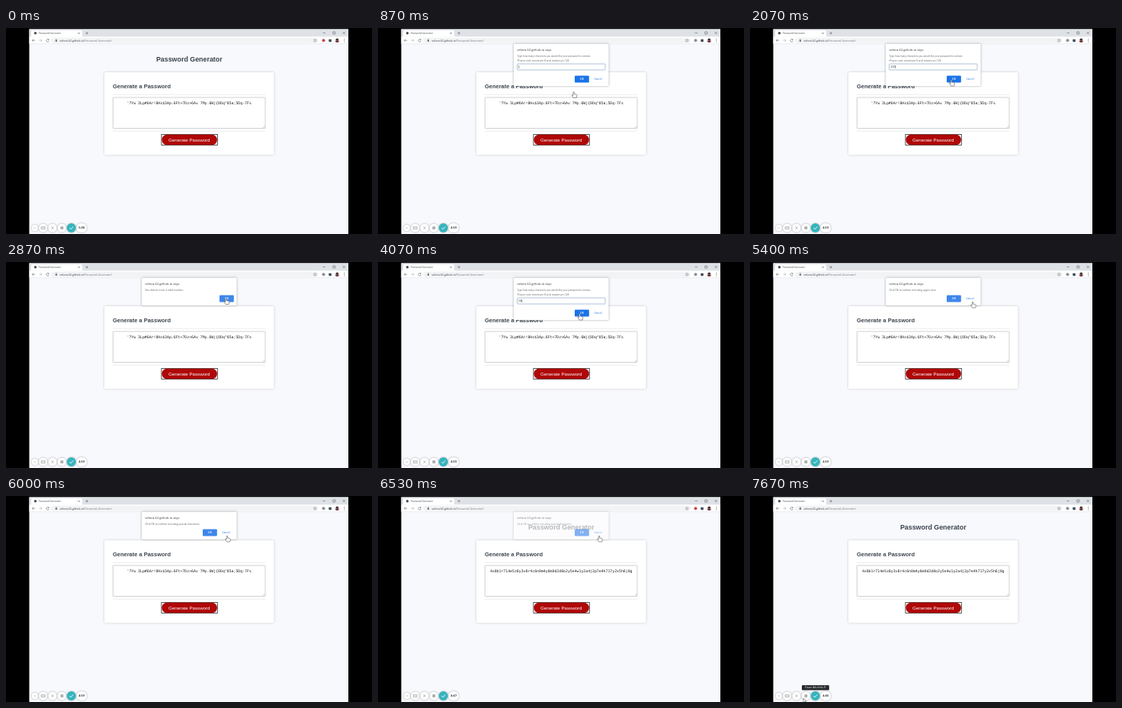
An HTML page for the animation above (7740 ms loop, 480x270 px).

```html
<!DOCTYPE html>
<html lang="en">
<head>
<meta charset="utf-8">
<title>Password Generator</title>
<style>
  html, body { margin: 0; width: 100%; height: 100%; overflow: hidden; background: #000; }
  svg { display: block; width: 100vw; height: 100vh; }
  text { white-space: pre; }
  .ui { font-family: "Open Sans", "Noto Sans", sans-serif; }
  .page { font-family: "Liberation Sans", Arial, sans-serif; }
  .mono { font-family: "DejaVu Sans Mono", "Noto Sans Mono", monospace; }
  .mid { text-anchor: middle; }
  .line { fill: none; stroke: #5f6368; stroke-width: .6; }
  .card { filter: drop-shadow(0 .6px 1.6px rgba(0, 0, 0, .2)); }
  .dialog { filter: drop-shadow(0 .8px 1.6px rgba(0, 0, 0, .35)); }
  .knob { fill: #fff; filter: drop-shadow(0 .4px .8px rgba(0, 0, 0, .35)); }
</style>
</head>
<body>
<svg id="stage" viewBox="0 0 480 270">
  <rect width="480" height="270" fill="#000"/>
  <rect x="30.5" y="1.5" width="418.5" height="268.5" fill="#f8f9fd"/>

  <!-- browser frame -->
  <g class="ui">
    <rect x="30.5" y="1.5" width="418.5" height="10" fill="#dee1e6"/>
    <path d="M31.5 11.5Q33 11.5 33 10V4.5Q33 3 34.5 3H98.500Q100 3 100 4.500V10Q100 11.500 101.500 11.500Z" fill="#fff"/>
    <rect x="30.5" y="11.500" width="418.500" height="9" fill="#fff"/>
    <rect x="59" y="12.700" width="351" height="6.800" rx="3.400" fill="#f1f3f4"/>
    <path d="M30.5 20.600H449" stroke="#dcdfe3" stroke-width=".5"/>
    <circle cx="38.500" cy="6.800" r="1.700" fill="#4b4f54"/>
    <text x="43" y="8" font-size="3.050" fill="#4b4f54">Password Generator</text>
    <path class="line" d="M94.500 5.700l2.200 2.200m0-2.200l-2.200 2.200M104.400 6.800h3.400m-1.700-1.700v3.400M415.500 6.500h3.400M428.800 5h3v3h-3zM441.700 5l3 3m0-3l-3 3"/>
    <path class="line" d="M38.200 16.200h-3.800m1.700-1.700l-1.700 1.700l1.700 1.700M56 15.200a1.800 1.800 0 1 0 .4 1.600m-.2-2.500v1.300h-1.300"/>
    <path class="line" d="M43.300 16.200h3.800m-1.700-1.700l1.700 1.700l-1.700 1.700" opacity=".5"/>
    <rect x="64.800" y="15.800" width="2.200" height="1.900" fill="#5f6368"/>
    <path class="line" d="M65.200 15.800v-.7a.7.7 0 0 1 1.400 0v.7" style="stroke-width:.4"/>
    <text x="70.500" y="17.500" font-size="3.600" fill="#3c4043">velora-62.github.io<tspan fill="#777c82">/Password-Generator/</tspan></text>
    <path class="line" d="M405.200 14.200l.6 1.400 1.500.1-1.100 1 .3 1.500-1.300-.8-1.300.8.3-1.500-1.100-1 1.500-.1z" style="stroke-width:.4"/>
    <circle id="rec" cx="416.500" cy="16.300" r="2"/>
    <rect x="423.300" y="14.700" width="3.500" height="3.500" rx=".6" fill="#3f4a59"/>
    <circle cx="434.300" cy="16.200" r="2.900" fill="#d9c7c4"/>
    <circle cx="434.300" cy="15.300" r="1.500" fill="#33272a"/>
    <path d="M431.900 17.800a2.500 1.700 0 0 1 4.800 0a2.900 2.900 0 0 1-4.800 0z" fill="#74343b"/>
    <path d="M443.800 14.400v.01m0 1.800v.01m0 1.800v.01" stroke="#5f6368" stroke-width="1" stroke-linecap="round"/>
  </g>

  <!-- page -->
  <g class="page" fill="#3b444e">
    <text class="mid" x="240.300" y="44.300" font-size="8.900" font-weight="700">Password Generator</text>
    <rect class="card" x="129" y="58" width="222.500" height="108.300" rx="1.500" fill="#fff"/>
    <text x="140" y="79.300" font-size="7.470" font-weight="700">Generate a Password</text>
    <path d="M140 87.300H340M140 135.200H340" stroke="#e7e9eb" stroke-width=".8"/>
    <rect x="140.300" y="91" width="199.700" height="40.500" rx=".8" fill="#fff" stroke="#b9bec4" stroke-width=".7"/>
    <path d="M336.500 131l3-3m-1.300 3l1.300-1.300" stroke="#999" stroke-width=".4"/>
    <text id="password" class="mono mid" x="240.200" y="100.200" font-size="4.850" fill="#222"></text>
    <rect x="203.900" y="139.400" width="73.400" height="14.200" fill="#fff" stroke="#2b2b2b" stroke-width=".8"/>
    <rect x="204.300" y="139.800" width="72.600" height="13.400" rx="6.500" fill="#af0808"/>
    <text class="mid" x="240.300" y="148.700" font-size="6.170" fill="#fff">Generate Password</text>
  </g>

  <g id="dialogs" class="ui"></g>

  <!-- recorder controls -->
  <g class="ui">
    <circle class="knob" cx="37.800" cy="262" r="4.300"/>
    <circle class="knob" cx="48.700" cy="262" r="5.600"/>
    <circle class="knob" cx="61" cy="262" r="5.600"/>
    <circle class="knob" cx="73.300" cy="262" r="5.600"/>
    <circle class="knob" cx="85.700" cy="262" r="5.900" style="fill:#35b5bd"/>
    <rect class="knob" x="92.300" y="256" width="13.800" height="12" rx="6"/>
    <path class="line" d="M36.400 262h2.800M46.200 260.300h5v3.400h-5zM46.200 262h5M59.300 260.300l3.400 3.400m0-3.400l-3.400 3.400" opacity=".65"/>
    <path d="M72.300 260.100v3.800m2-3.800v3.800" stroke="#555" stroke-width=".9"/>
    <path d="M83.300 262.100l1.700 1.700l3.200-3.500" fill="none" stroke="#fff" stroke-width=".9"/>
    <text id="timer" class="mid" x="99.200" y="263.400" font-size="4" font-weight="700" fill="#3d4145"></text>
    <g id="tip">
      <rect x="68" y="248" width="35.800" height="6.600" rx="1" fill="#26282b"/>
      <text class="mid" x="85.900" y="252.400" font-size="3.100" fill="#fff">Pause (Alt+Shift+P)</text>
    </g>
  </g>

  <g id="cursor" stroke="#555" stroke-width=".6" stroke-linejoin="round" fill="#fff">
    <path id="hand" d="M-.7.6Q0-.5.7.6V3l3 .7Q4.500 4 4.300 5L3.700 8H-.4L-2.400 5Q-2.600 3.900-1.600 4.200L-.7 5Z"/>
    <path id="arrow" d="M0 0V5.600L1.300 4.500L2.200 6.500L3.100 6.100L2.200 4.200H4Z"/>
  </g>
</svg>
<script>
const LOOP = 7740, STEP = 200 / 3, BLUE = "#1a73e8";
const $ = id => document.getElementById(id);
const clamp = v => Math.max(0, Math.min(1, v));

const OLD_PASS = "'7Yw 3Lp#6Ar!0Hx$3Ap.6Ft=7Dz>6Av 7My.6Wj{0Dq^85a;5Dq-7Fs";
const NEW_PASS = "4x8b1r714e5z8y3v8r4c6n0m4y6m0d2d8o2y5e4w1y2a4j2p7e4h717y2x5h6j0g";
const DONE = 6470;

const ask = ["Type how many characters you would like your password to contain.",
  "Please note minimum 8 and maximum 128"];
const confirmText = what => ["Click OK to confirm including " + what];

const dialogs = [
  { from: 700, to: 2260, kind: "prompt", text: ask, typed: [[1590, "2"], [1720, "20"], [2050, "200"]] },
  { from: 2300, to: 2920, kind: "alert", text: ["You did not enter a valid number."] },
  { from: 2960, to: 4200, kind: "prompt", text: ask, typed: [[3320, "6"], [3450, "64"]] },
  { from: 4250, to: 4660, kind: "confirm", text: confirmText("lower case.") },
  { from: 4700, to: 5060, kind: "confirm", text: confirmText("numbers.") },
  { from: 5100, to: 5600, kind: "confirm", text: confirmText("upper case.") },
  { from: 5650, to: DONE, kind: "confirm", text: confirmText("special characters") }
];

// time, x, y of the pointer tip
const path = [
  [66, 87, 262], [600, 244, 146], [730, 244, 146], [867, 256.6, 83.500], [1130, 264, 68],
  [2270, 264, 68], [2730, 288.500, 47.500], [2930, 288.500, 47.500], [3600, 274, 62],
  [3930, 264.500, 68], [4270, 264.500, 68], [4530, 267, 48], [5070, 267, 48],
  [5330, 292, 52], [5670, 292, 52], [5930, 290, 52], [6670, 290, 52],
  [7000, 225, 120], [7530, 70, 265]
];

const recOn = [[0, 330], [1200, 1530], [3130, 3470], [4530, 4870], [6330, 6600]];

const label = (x, y, size, fill, text, extra = "") =>
  `<text x="${x}" y="${y}" font-size="${size}" fill="${fill}" ${extra}>${text}</text>`;

function buildDialog(d) {
  const prompt = d.kind === "prompt", alert = d.kind === "alert";
  const top = prompt ? 62.6 : 43.4, okX = alert ? 280 : 258;
  let html = `<rect class="dialog" x="178" y="20.800" width="124.500" height="${prompt ? 55.200 : 36.200}" rx="1.200" fill="#fff"/>`;
  html += label(182.5, 30, 4.1, "#303438", "velora-62.github.io says");
  d.text.forEach((s, i) => {
    const size = prompt ? 3.05 + i * .35 : 3.25;
    html += label(182.500, 37.7 + i * 5.900, size, "#5f6368", s);
  });
  if (prompt) {
    html += `<rect x="182.600" y="47" width="115.400" height="8" rx=".8" fill="#fff" stroke="#8fa6c9" stroke-width=".7"/>`;
    html += label(184.500, 52.300, 3.400, "#333", "", 'data-typed=""');
    html += `<path data-caret="" d="M0 49v4" stroke="#333" stroke-width=".5"/>`;
  }
  html += `<rect x="${okX}" y="${top}" width="18.800" height="9" rx="1" fill="${prompt ? BLUE : "#3d86ea"}"/>`;
  html += label(okX + 9.4, top + 5.700, 3.300, "#fff", "OK", 'class="mid" font-weight="600"');
  if (!alert) html += label(288.500, top + 5.700, 3.300, BLUE, "Cancel", 'class="mid"');
  const g = document.createElementNS("http://www.w3.org/2000/svg", "g");
  g.innerHTML = html;
  $("dialogs").append(g);
  d.node = g;
  d.input = g.querySelector("[data-typed]");
  d.caret = g.querySelector("[data-caret]");
}

function pointer(t) {
  const i = path.findIndex(p => p[0] > t);
  if (i < 0) return path[path.length - 1].slice(1);
  if (i === 0) return path[0].slice(1);
  const a = path[i - 1], b = path[i];
  const k = (t - a[0]) / (b[0] - a[0]), e = k * k * (3 - 2 * k);
  return [a[1] + (b[1] - a[1]) * e, a[2] + (b[2] - a[2]) * e];
}

function show(node, on) {
  node.style.display = on ? "" : "none";
}

function render(t) {
  for (const d of dialogs) {
    const alpha = clamp((t - d.from) / 100) * clamp(1 - (t - d.to) / 170);
    show(d.node, alpha > 0);
    d.node.setAttribute("opacity", alpha);
    if (!d.typed) continue;
    const value = d.typed.reduce((s, [at, text]) => t >= at ? text : s, "");
    d.input.textContent = value;
    d.caret.setAttribute("transform", `translate(${184.800 + value.length * 1.950} 0)`);
  }

  $("password").textContent = t < DONE ? OLD_PASS : NEW_PASS;
  // the counter stands still while dialogs block the page
  $("timer").textContent = t < 400 ? "5:00" : t < DONE ? "4:59" : t < 7050 ? "4:47" : "4:46";
  $("rec").setAttribute("fill", recOn.some(([a, b]) => t >= a && t < b) ? "#d0444a" : "#8b9095");
  show($("tip"), t >= 7570);

  const [x, y] = pointer(t), arrow = t < 540 || t > 6700;
  show($("cursor"), t >= 60);
  show($("arrow"), arrow);
  show($("hand"), !arrow);
  $("cursor").setAttribute("transform", `translate(${x} ${y})`);
}

dialogs.forEach(buildDialog);
const start = performance.now();
function tick() {
  const t = (performance.now() - start) % LOOP;
  render(Math.floor(t / STEP + .06) * STEP);
  requestAnimationFrame(tick);
}
tick();
</script>
</body>
</html>
```
